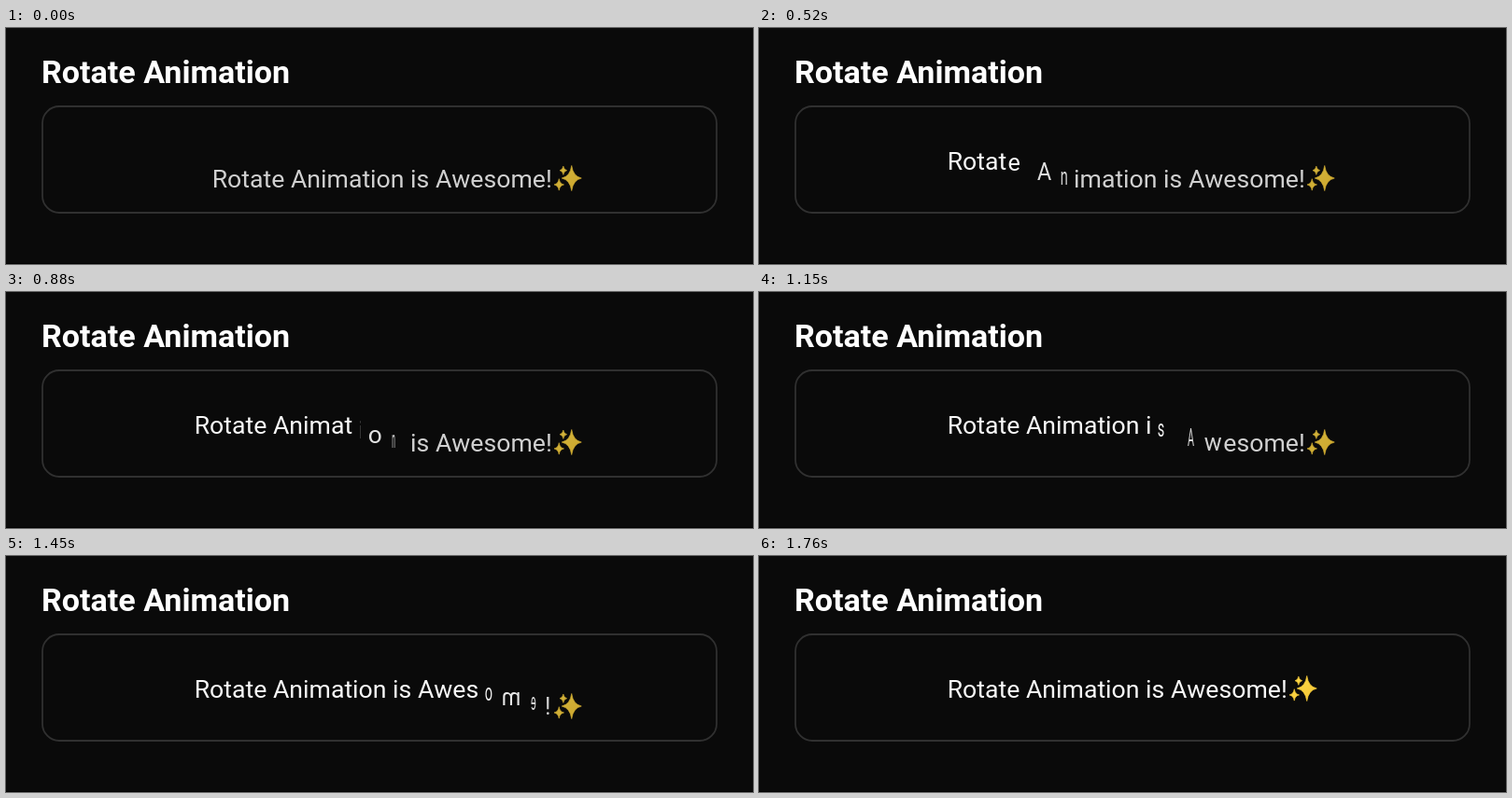
Write an HTML page that moves like this. It is 800 by 253 pixels and loops after 1.79 s.

```html
<!DOCTYPE html>
<html lang="en">
<head>
<meta charset="utf-8">
<title>Rotate Animation</title>
<style>
  html, body { margin: 0; width: 100%; height: 100%; overflow: hidden; background: #0a0a0a; }
  svg { display: block; width: 800px; height: 253px; }
  text { font-family: Roboto, sans-serif; font-kerning: none; fill: #fff; }
  .title { font-size: 34.1px; font-weight: 600; font-kerning: auto; }
  .glyph { font-size: 26.65px; text-anchor: middle; fill: #f8f8f8; }
</style>
</head>
<body>
<svg viewBox="0 0 800 253">
  <defs>
    <linearGradient id="gold" x1="0" y1="0" x2="1" y2="1">
      <stop offset="0" stop-color="#ffdc4a"/>
      <stop offset="1" stop-color="#f3c433"/>
    </linearGradient>
  </defs>
  <rect width="800" height="253" fill="#0a0a0a"/>
  <rect y="252" width="800" height="1" fill="#000"/>
  <text class="title" x="38" y="59">Rotate Animation</text>
  <rect x="39" y="84" width="722" height="114" rx="18" fill="none" stroke="#303030" stroke-width="1.8"/>
  <g id="line"></g>
</svg>
<script>
const NS = "http://www.w3.org/2000/svg";
const LOOP = 1790, FPS = 33;
const START = 90, STAGGER = 50, DURATION = 190;
const SHIFT = 19, BASELINE = 151.5, LEFT = 201.7, FONT_SIZE = 26.65, SPARKLE_WIDTH = 34;

const line = document.getElementById("line");
const pen = document.createElement("canvas").getContext("2d");
pen.font = `${FONT_SIZE}px Roboto, sans-serif`;

function add(parent, tag, attrs) {
  const node = document.createElementNS(NS, tag);
  for (const key in attrs) node.setAttribute(key, attrs[key]);
  return parent.appendChild(node);
}

// Four-pointed star with concave sides
function star(x, y, rx, ry) {
  const a = rx * 0.15, b = ry * 0.15;
  return `M${x} ${y - ry}Q${x + a} ${y - b} ${x + rx} ${y}Q${x + a} ${y + b} ${x} ${y + ry}` +
    `Q${x - a} ${y + b} ${x - rx} ${y}Q${x - a} ${y - b} ${x} ${y - ry}Z`;
}

function sparkles() {
  const group = add(line, "g", {});
  const d = star(4, -9.5, 10.5, 13.5) + star(-4.9, -17.8, 3.8, 4.6) + star(-9.5, -2.6, 5.2, 6.2);
  add(group, "path", { d, fill: "url(#gold)", stroke: "#f5cb38", "stroke-width": 0.7, "stroke-linejoin": "round" });
  return group;
}

function letter(char) {
  const node = add(line, "text", { class: "glyph" });
  node.textContent = char;
  return node;
}

let cursor = LEFT;
const glyphs = [..."Rotate Animation is Awesome!", "sparkles"].map(char => {
  const isSparkle = char === "sparkles";
  const width = isSparkle ? SPARKLE_WIDTH : pen.measureText(char).width;
  const x = cursor + width / 2;
  cursor += width;
  return { node: isSparkle ? sparkles() : letter(char), x };
});

function render(time) {
  glyphs.forEach(({ node, x }, i) => {
    const p = Math.min(1, Math.max(0, (time - START - i * STAGGER) / DURATION));
    const offset = SHIFT * (1 - p);
    const turn = Math.cos(2 * Math.PI * p);
    node.setAttribute("transform", `translate(${x + offset} ${BASELINE + offset}) scale(${turn} 1)`);
    node.setAttribute("opacity", 0.83 + 0.17 * p);
  });
}

// The motion is stepped: 33 poses a second, each on a 10 ms mark
function tick() {
  const time = performance.now() % LOOP;
  const step = Math.floor((time + 5) * FPS / 1000);
  render(Math.round(step * 100 / FPS) * 10);
  requestAnimationFrame(tick);
}
tick();
</script>
</body>
</html>
```
